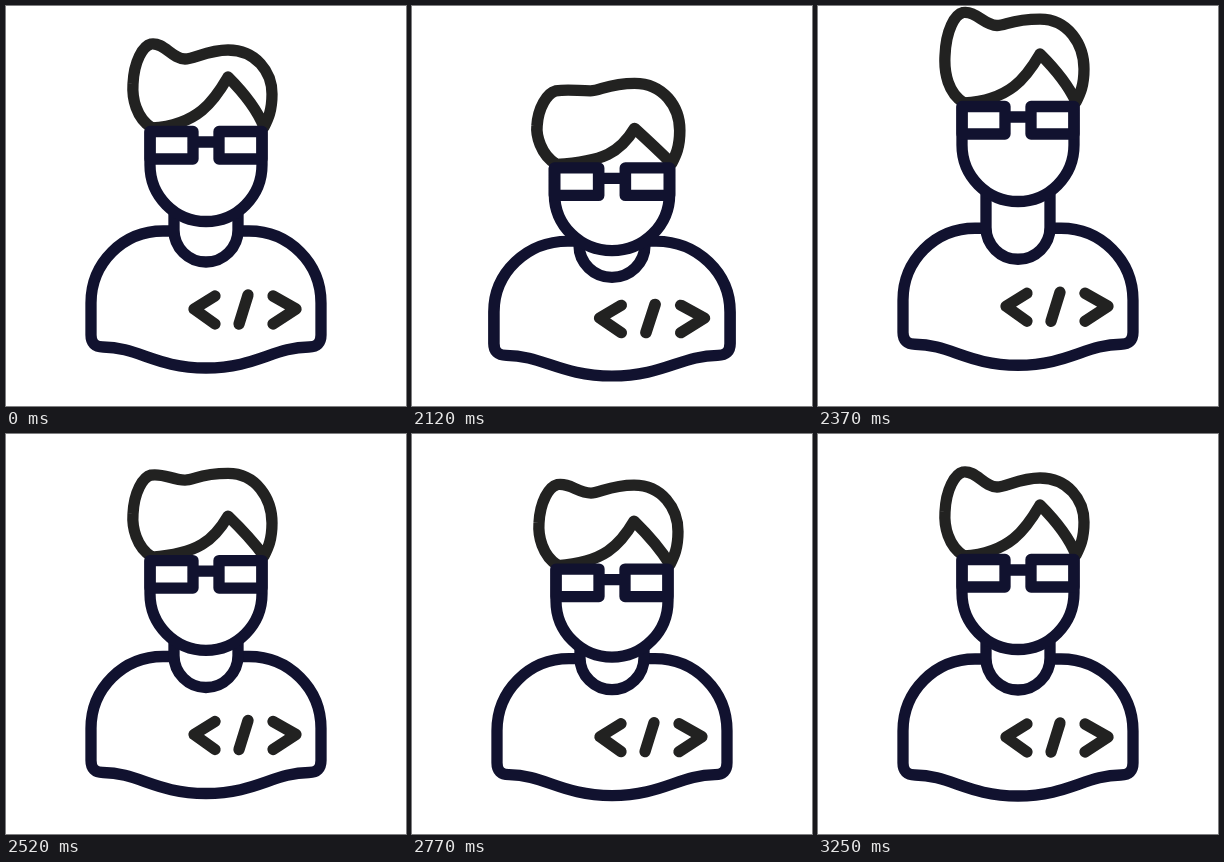
These frames come from a looping animation (400 px wide and 400 px high, 3270 ms). An HTML page:

```html
<!DOCTYPE html>
<html>
<head>
<meta charset="utf-8">
<style>
  html, body { margin: 0; height: 100%; overflow: hidden; background: #fff; }
  svg { display: block; width: 100%; height: 100%; }
  path { fill: none; stroke: #11122f; stroke-width: 11.3; stroke-linecap: round; stroke-linejoin: round; }
  #hair, #code { stroke: #222221; }
</style>
</head>
<body>
<svg viewBox="0 0 400 400">
  <g id="figure">
    <path id="hair"/>
    <g id="chest">
      <path id="code" d="M209 290L188 303L209 318M242 289L233 318M267 290L290 303L267 318"/>
      <path d="M165 225H157C117 225 85 257 85 297V329Q85 341 97 341C132 341 150 362 200 362C250 362 268 341 303 341Q315 341 315 329V297C315 257 283 225 243 225H235"/>
    </g>
    <path id="neck"/>
    <path id="face"/>
    <path id="glasses" d="M144 125.500H187V153H144ZM213 125.500H256V153H213ZM187 136H213"/>
  </g>
</svg>
<script>
const LOOP = 3270, START = 2020, STEP = 25;
const el = id => document.getElementById(id);

// Eases from one [time, value] point to the next
const track = (...points) => t => {
  const i = points.findIndex(p => p[0] > t);
  if (i < 1) return 0;
  const [t0, a] = points[i - 1], [t1, b] = points[i];
  return a + (b - a) * (1 - Math.cos(Math.PI * (t - t0) / (t1 - t0))) / 2;
};

// Crouch, jump, land, settle
const headAt = track([-25, 0], [85, 37], [330, -25], [390, -25], [635, 37], [820, -3], [1100, 0]);
const bodyAt = track([-25, 0], [65, 10.5], [190, -3], [500, -2.5], [630, 10.5], [800, -3], [1150, 0]);
// The hair sinks under its weight and its top evens out
const sinkAt = track([-25, 0], [100, 15], [350, 2], [625, 16], [850, 0]);
const levelAt = track([0, 0], [200, 9], [500, 8], [625, 3], [875, 4], [1100, 0]);

function draw(t) {
  const head = headAt(t), body = bodyAt(t), sink = sinkAt(t), level = levelAt(t);
  const squash = Math.max(body, 0);
  const transform = (id, value) => el(id).setAttribute('transform', value);
  const path = (id, d) => el(id).setAttribute('d', d);

  transform('figure', `translate(200 0) scale(${1 + squash / 300} 1) translate(-200 0)`);
  transform('chest', `translate(0 ${362 + body}) scale(1 ${1 - squash / 500}) translate(0 -362)`);
  transform('glasses', `translate(0 ${head})`);
  transform('hair', `translate(0 ${head})`);

  const jaw = 159 + head * 0.8;
  path('face', `M144 ${126 + head}V${jaw}A56 56.500 0 0 0 256 ${jaw}V${126 + head}`);

  const collar = 224 + body + squash * 0.9, nape = Math.min(jaw + 48, collar);
  path('neck', `M168 ${nape}V${collar}A32 32 0 0 0 232 ${collar}V${nape}`);

  const bulb = 38 + sink - level, notch = 53 - level, crown = 44 - level * 0.7, tip = 71 + sink;
  path('hair', `M146 122C130 112 126 92 127 ${59 + bulb / 2}
    C128 ${bulb + 17} 137 ${bulb + 2} 145 ${bulb}
    C158 ${bulb - 2} 166 ${notch} 179 ${notch}
    C188 ${notch} ${202 - level} ${crown} 222 ${crown}
    C250 ${crown} 266 ${crown / 2 + 44} 266 88
    C266 105 262 113 258 121
    C${252 - sink / 3} ${106 + sink / 4} ${238 - sink / 4} ${87 + sink * 0.7} 222 ${tip}
    C208 ${tip + 24} 192 119 146 122`);
}

function frame() {
  const t = performance.now() % LOOP - START;
  draw(Math.floor(t / STEP) * STEP);
  requestAnimationFrame(frame);
}
frame();
</script>
</body>
</html>
```
